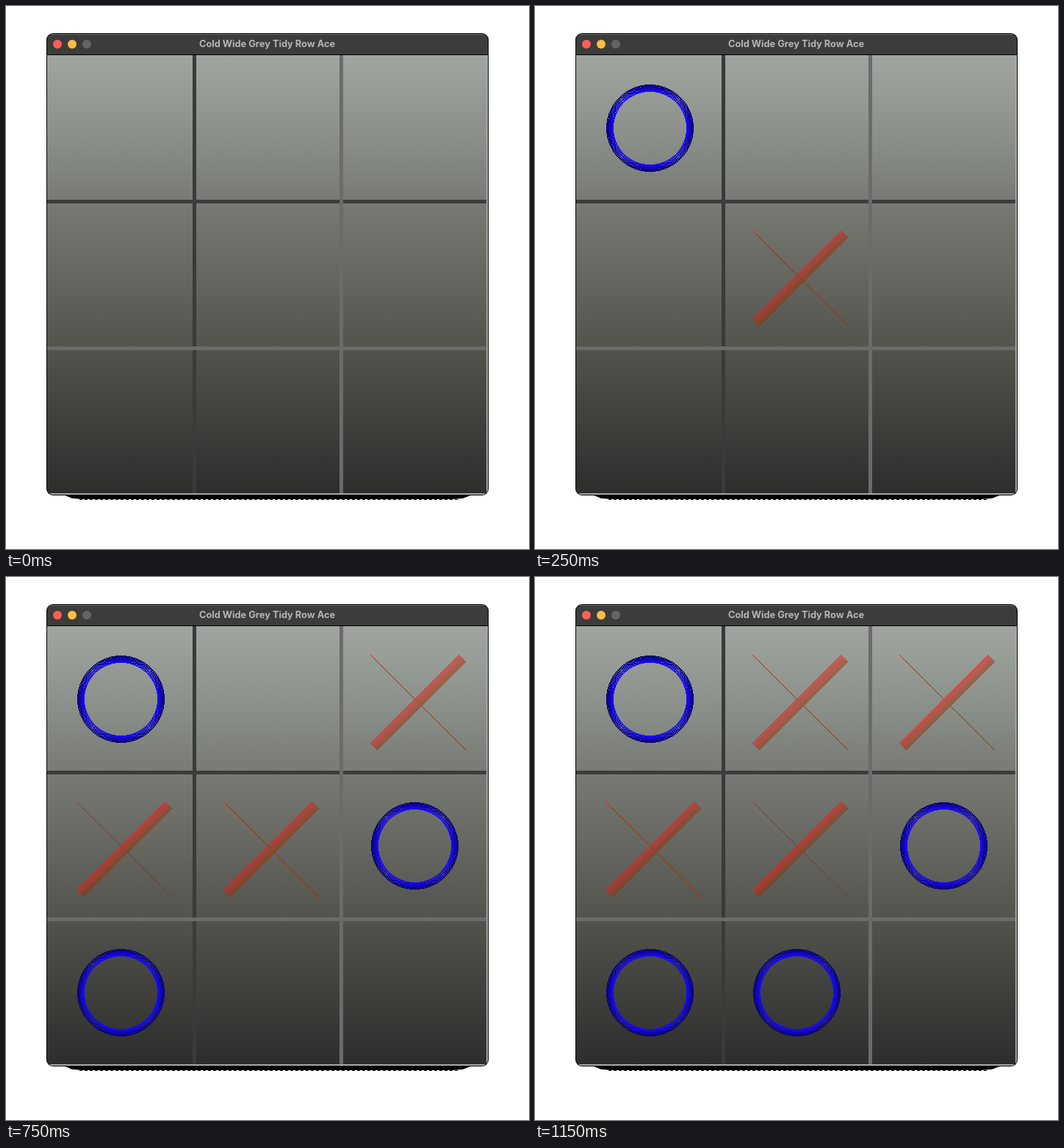
These frames come from a looping animation (712 by 740 pixels, 1250 ms). An HTML page with a canvas:

```html
<!DOCTYPE html>
<html lang="en">
<head>
<meta charset="utf-8">
<title>Tic-tac-toe</title>
<style>
html, body { margin: 0; width: 100%; height: 100%; overflow: hidden; background: #fff; }
canvas { display: block; }
</style>
</head>
<body>
<canvas id="stage" width="712" height="740"></canvas>
<script>
const ctx = document.getElementById('stage').getContext('2d');
const TITLE = 'Cold Wide Grey Tidy Row Ace';
const STEP = 250, TURNS = 5, CELL = 200;

// column and row of each move; both marks appear together each turn
const crosses = [[1, 1], [2, 0], [0, 1], [1, 0]];
const rings = [[0, 0], [0, 2], [2, 1], [1, 2]];

function rect(color, x, y, w, h) {
  ctx.fillStyle = color;
  ctx.fillRect(x, y, w, h);
}

function disc(color, x, y, r) {
  ctx.fillStyle = color;
  ctx.beginPath();
  ctx.arc(x, y, r, 0, Math.PI * 2);
  ctx.fill();
}

function roundBox(x, y, w, h, r) {
  ctx.beginPath();
  ctx.roundRect(x, y, w, h, r);
}

function drawShadow() {
  ctx.fillStyle = '#000';
  ctx.beginPath();
  ctx.moveTo(78, 666);
  ctx.lineTo(90, 671);
  ctx.lineTo(104, 672);
  ctx.lineTo(608, 672);
  ctx.lineTo(622, 671);
  ctx.lineTo(635, 666);
  ctx.fill();
  for (let x = 100; x < 612; x += 7) rect('#000', x, 672, 4, 1);
}

function drawBoard() {
  const g = ctx.createLinearGradient(0, 67, 0, 664);
  const stops = [[0, '#a0a5a0'], [0.17, '#8c928b'], [0.33, '#787a75'],
    [0.5, '#666760'], [0.67, '#52534d'], [0.83, '#40413c'], [1, '#2d2d2d']];
  for (const [at, color] of stops) g.addColorStop(at, color);
  rect(g, 56, 67, 600, 597);
  rect('#3a3a39', 254, 67, 5, 597);
  rect('#3c3c3b', 56, 264, 598, 5);
  rect('#6b6b6c', 454, 67, 5, 597);
  rect('#6b6b6b', 56, 464, 598, 5);
}

function drawWindow() {
  drawShadow();
  ctx.fillStyle = '#000';
  roundBox(55, 37, 602, 630, 9);
  ctx.fill();
  ctx.save();
  roundBox(56, 38, 600, 628, 8);
  ctx.clip();
  rect('#3c3c3b', 56, 38, 600, 28);
  rect('#6e6e6e', 56, 38, 600, 1);
  rect('#000', 56, 66, 600, 1);
  drawBoard();
  rect('#a8a8a8', 654, 67, 2, 597);
  rect('#a8a8a8', 56, 664, 600, 2);
  ctx.restore();

  disc('#fe5f58', 70, 52, 6);
  disc('#ffbd44', 90, 52, 6);
  disc('#646464', 110, 52, 6);
  ctx.fillStyle = '#b6b6b6';
  ctx.font = '700 12.8px Inter, sans-serif';
  ctx.textAlign = 'center';
  ctx.fillText(TITLE, 355.5, 56);
}

// ten shifted one-pixel strokes: one diagonal hatches, the other overlaps itself
function drawCross(col, row) {
  const x = 96 + col * CELL, y = 106 + row * CELL;
  for (let i = 0; i < 10; i++) {
    const k = i / 9;
    ctx.fillStyle = `rgb(${255 - 110 * k}, ${22 + 28 * k}, ${24 - 20 * k})`;
    for (let j = 0; j <= 120; j++) {
      ctx.fillRect(x + i + j, y + i + j, 1, 1);
      ctx.fillRect(x + i + j, y + i + 120 - j, 1, 1);
    }
  }
}

// concentric one-pixel circles; rounding leaves the fine moire gaps
function drawRing(col, row) {
  const cx = 156 + col * CELL, cy = 166 + row * CELL;
  for (let r = 50; r < 60; r++) {
    const k = (r - 50) / 9;
    ctx.fillStyle = `rgb(${24 - 14 * k}, ${8 - 6 * k}, ${255 - 145 * k})`;
    for (let a = 0; a <= r * Math.SQRT1_2; a++) {
      const b = Math.round(Math.sqrt(r * r - a * a));
      for (const sa of [-a, a]) {
        for (const sb of [-b, b]) {
          ctx.fillRect(cx + sa, cy + sb, 1, 1);
          ctx.fillRect(cx + sb, cy + sa, 1, 1);
        }
      }
    }
  }
}

function draw(turn) {
  rect('#fff', 0, 0, 712, 740);
  drawWindow();
  for (let i = 0; i < turn; i++) {
    drawCross(...crosses[i]);
    drawRing(...rings[i]);
  }
}

function tick() {
  draw(Math.floor(performance.now() / STEP) % TURNS);
  requestAnimationFrame(tick);
}
tick();
</script>
</body>
</html>
```
